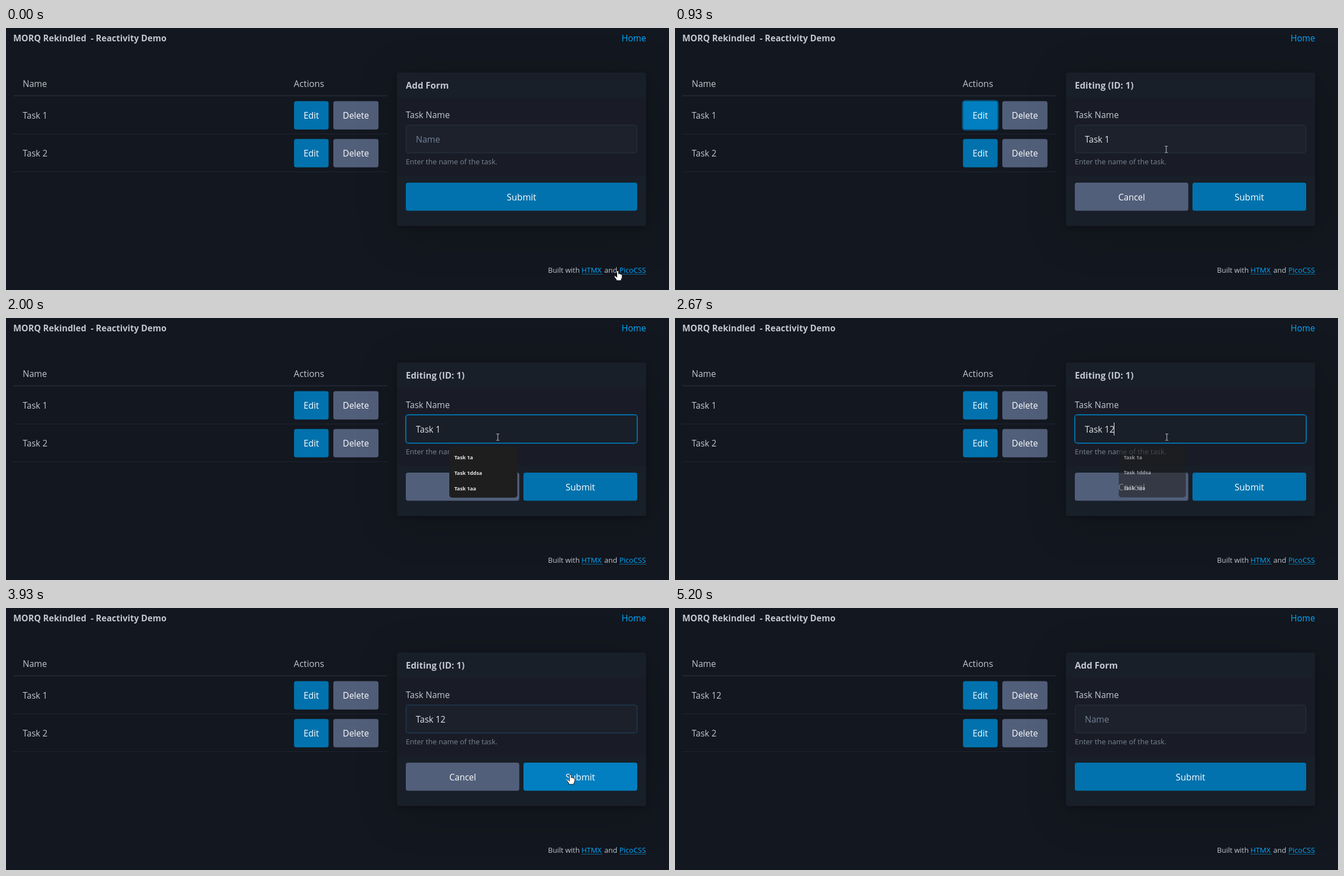
These frames come from a looping animation (1189x471 px, 5670 ms). An HTML page:

```html
<!DOCTYPE html>
<html lang="en">
<head>
<meta charset="utf-8">
<title>Reactivity Demo</title>
<style>
html, body { margin: 0; width: 100%; height: 100%; overflow: hidden; background: #13171f; }
svg { display: block; width: 1189px; height: 471px; font: 15.5px "Open Sans", "Noto Sans", sans-serif; fill: #c2c7d0; }
.bold { font-weight: 700; }
.small { font-size: 13px; }
.mid { text-anchor: middle; fill: #fff; }
.muted { fill: #7b8495; }
.link { fill: #01aaff; }
.blue { fill: #0172ad; }
.grey { fill: #525f7a; }
.row { fill: #202632; }
.shadow { filter: drop-shadow(0 2px 5px rgba(7,9,12,.4)) drop-shadow(6px 12px 36px rgba(7,9,12,.2)); }
#popup { transform-origin: 856px 277px; }
#popup text { font-size: 9.2px; font-weight: 700; fill: #e6e6e6; }
#hand, #arrow { fill: #fff; stroke: #111; stroke-width: 1; stroke-linejoin: round; }
#beam { fill: none; stroke: #ccc; }
</style>
</head>
<body>
<svg viewBox="0 0 1189 471">
  <text class="bold" x="13" y="24">MORQ Rekindled</text>
  <text class="bold" x="152" y="24">- Reactivity Demo</text>
  <text class="link" x="1104" y="24">Home</text>

  <text x="30" y="106">Name</text>
  <text x="516" y="106" font-size="16">Actions</text>
  <rect class="row" x="13" y="120.7" width="671" height="2.2"/>
  <rect class="row" x="13" y="190" width="671" height="1"/>
  <rect class="row" x="13" y="258" width="671" height="1"/>
  <text id="task" x="30" y="162.5"></text>
  <text x="30" y="230.5">Task 2</text>
  <rect id="ring" fill="none" stroke="#0b4d74"/>
  <rect id="edit" x="516.5" y="131.5" width="62" height="51" rx="4"/>
  <rect class="blue" x="516.5" y="199.5" width="62" height="51" rx="4"/>
  <rect class="grey" x="587" y="131.5" width="81" height="51" rx="4"/>
  <rect class="grey" x="587" y="199.5" width="81" height="51" rx="4"/>
  <g class="mid">
    <text x="547.5" y="162.5">Edit</text><text x="627.5" y="162.5">Delete</text>
    <text x="547.5" y="230.5">Edit</text><text x="627.5" y="230.5">Delete</text>
  </g>

  <rect class="shadow" x="701" y="80" width="447" height="276" rx="4" fill="#181f28"/>
  <rect x="701" y="126" width="447" height="140" fill="#191c26"/>
  <text id="heading" class="bold" x="717" y="109" font-size="16"></text>
  <text x="717" y="162">Task Name</text>
  <rect id="field" x="717.5" y="174.5" width="414" height="50" rx="4"/>
  <rect id="focus" x="716.5" y="173.5" width="416" height="52" rx="4.5" fill="none" stroke="#0172ad"/>
  <text id="value" x="735" y="206"></text>
  <rect id="caret" y="188" width="1" height="23" fill="#e8eaee"/>
  <text class="small muted" x="717" y="245">Enter the name of the task.</text>
  <g id="cancel">
    <rect class="grey" x="717" y="278" width="203.5" height="50.5" rx="4"/>
    <text class="mid" x="819" y="309.5">Cancel</text>
  </g>
  <rect id="submit" y="278" height="50.5" rx="4"/>
  <text id="submitText" class="mid" y="309.5" font-size="16">Submit</text>
  <g id="popup">
    <rect x="795" y="231" width="122" height="92" rx="5" fill="#1e1e1e"/>
    <text x="804" y="253.5">Task 1a</text>
    <text x="804" y="281.5">Task 1ddsa</text>
    <text x="804" y="309.5">Task 1aa</text>
  </g>

  <g class="small">
    <text x="972" y="440">Built with</text>
    <text class="link" x="1032" y="440">HTMX</text>
    <text x="1073" y="440">and</text>
    <text class="link" x="1100" y="440">PicoCSS</text>
    <path d="M1032 442.5h38M1100 442.5h48" stroke="#0a6ea5"/>
  </g>

  <g id="cursor">
    <path id="hand" d="M-1.5 .5C-1.5-1 1.500-1 1.500 .5V5.500C2-.0 2 4.500 4 5.500C5 4.700 6 5.300 6.200 6.300C7.500 6 8 7 8 8V12L6.300 15V17H-2.500V15.300L-6 10.500C-6.500 9-5 8-3.800 9L-1.500 11Z"/>
    <path id="beam" d="M-2.500-5.500h2l.5.500l.5-.5h2M0-5v10.500M-2.500 6h2l.5-.5l.5.500h2"/>
    <path id="arrow" d="M0 0V13L3 10.300L5 14.500L7 13.600L5.200 9.500H9.300Z"/>
  </g>
</svg>
<script>
const LOOP = 5670, STEP = 1000 / 15;
const el = {};
document.querySelectorAll('[id]').forEach(e => el[e.id] = e);

// Pointer path: time, x, y
const path = [
  [0, 1097, 437], [600, 548, 160], [667, 548, 160], [930, 881, 218], [1200, 881, 218],
  [1333, 882, 214], [3067, 882, 214], [3400, 1021, 284], [3533, 1012, 300],
  [4200, 1012, 300], [4266, 988, 298], [4800, 246, 412], [5200, 45, 480]
];

const set = (e, attrs) => { for (const k in attrs) e.setAttribute(k, attrs[k]); };
const show = (e, on) => e.style.display = on ? '' : 'none';
const between = (t, a, b) => t >= a && t < b;
const inBox = (x, y, l, t, r, b) => between(x, l, r) && between(y, t, b);

function ramp(t, a, b) {
  const p = Math.min(1, Math.max(0, (t - a) / (b - a)));
  return p * p * (3 - 2 * p);
}

function mix(from, to, p) {
  return `rgb(${from.map((v, i) => Math.round(v + (to[i] - v) * p))})`;
}
const buttonColor = p => mix([1, 114, 173], [1, 127, 192], p);

function pointerAt(t) {
  let i = 0;
  while (i < path.length - 2 && t >= path[i + 1][0]) i++;
  const [a, ax, ay] = path[i], [b, bx, by] = path[i + 1];
  const p = ramp(t, a, b);
  return [ax + (bx - ax) * p, ay + (by - ay) * p];
}

function drawPointer(t, editing) {
  const [x, y] = pointerAt(t);
  const hand = inBox(x, y, 517, 131, 579, 183) || inBox(x, y, 587, 131, 668, 183) ||
    inBox(x, y, 517, 199, 579, 251) || inBox(x, y, 587, 199, 668, 251) ||
    inBox(x, y, 717, 278, 1132, 329) || inBox(x, y, 1032, 428, 1070, 446) ||
    inBox(x, y, 1095, 428, 1148, 446);
  const beam = inBox(x, y, 717, 174, 1132, 226);
  show(el.cursor, t < 5199);
  show(el.hand, hand);
  show(el.beam, beam);
  show(el.arrow, !hand && !beam);
  set(el.cursor, { transform: `translate(${Math.round(x)} ${Math.round(y)})` });
}

function draw(t) {
  const editing = between(t, 799, 4266);
  const typed = t >= 2599;
  const blur = ramp(t, 1450, 1650);

  // Table
  el.task.textContent = t >= 3990 ? 'Task 12' : 'Task 1';
  const ring = ramp(t, 640, 800) - blur, w = 2 * ring;
  set(el.edit, { fill: buttonColor(ramp(t, 470, 600) - blur) });
  set(el.ring, {
    x: 516.5 - w / 2, y: 131.5 - w / 2, width: 62 + w, height: 51 + w,
    rx: 4 + w / 2, 'stroke-width': w, opacity: ring
  });

  // Form
  el.heading.textContent = editing ? 'Editing (ID: 1)' : 'Add Form';
  el.value.textContent = !editing ? 'Name' : typed ? 'Task 12' : 'Task 1';
  set(el.value, { fill: editing ? '#e0e3e7' : '#738298' });
  const focus = blur - ramp(t, 3800, 4000);
  set(el.field, {
    fill: mix([28, 33, 44], [25, 31, 40], focus),
    stroke: mix([42, 49, 64], [1, 114, 173], focus)
  });
  set(el.focus, { opacity: focus * focus });
  show(el.caret, between(t, 1466, 1999) || between(t, 2530, 3130) || between(t, 3666, 3866));
  set(el.caret, { x: typed ? 787 : 777 });

  show(el.cancel, editing);
  const left = editing ? 928 : 717;
  const hover = ramp(t, 3290, 3400) * (t < 4266) + ramp(t, 4290, 4480) - ramp(t, 4500, 4700);
  set(el.submit, { x: left, width: 1132 - left, fill: buttonColor(hover) });
  set(el.submitText, { x: (left + 1132) / 2 });

  const shown = ramp(t, 1430, 1530) - ramp(t, 2590, 2760);
  el.popup.style.opacity = shown;
  el.popup.style.transform = `scale(${0.97 + 0.03 * shown})`;

  drawPointer(t);
}

const start = performance.now();
function tick() {
  const t = (performance.now() - start) % LOOP;
  draw(Math.floor((t + 4) / STEP) * STEP);
  requestAnimationFrame(tick);
}
tick();
</script>
</body>
</html>
```
